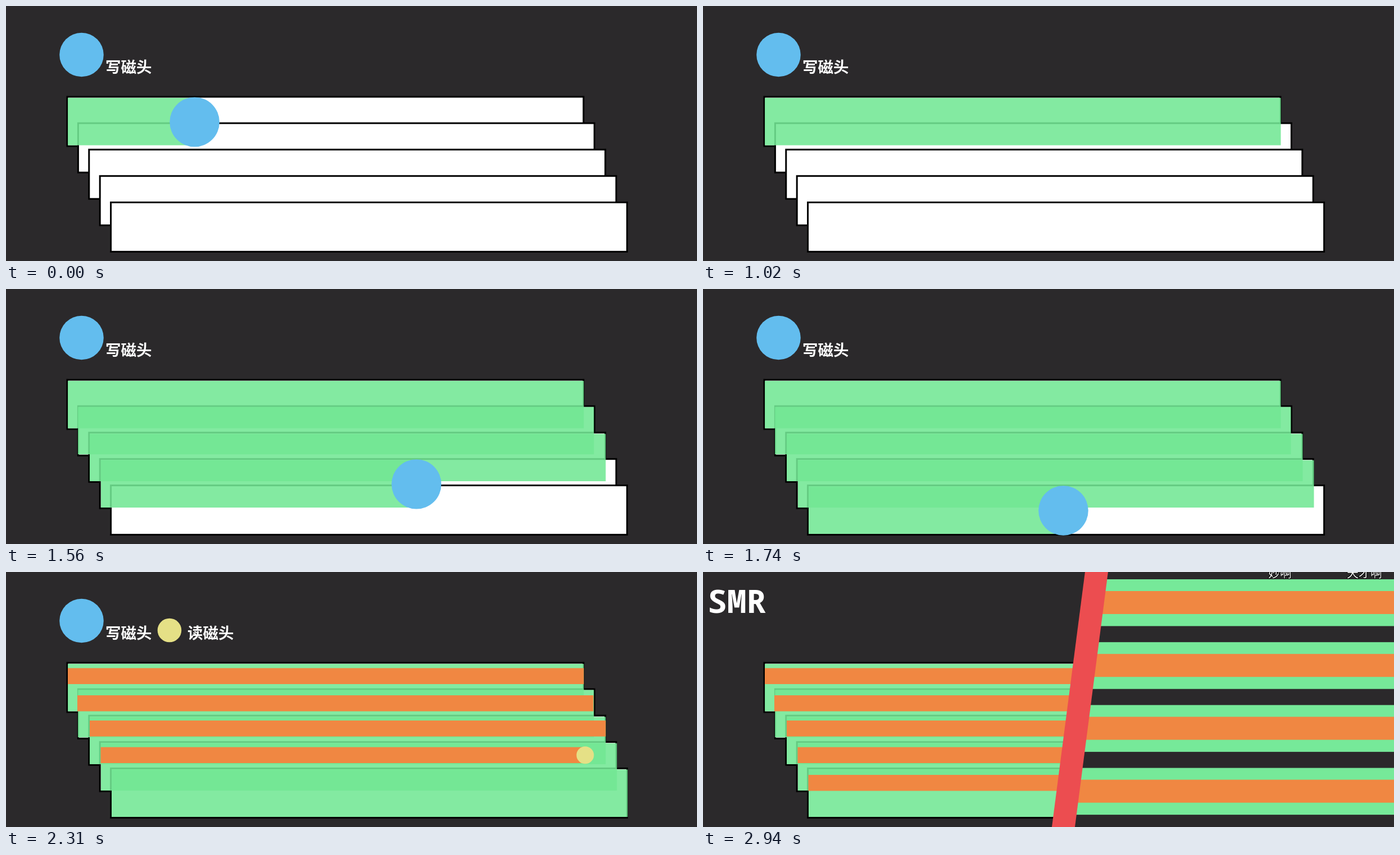
An HTML page with a canvas that plays this animation: 1230 by 455 pixels, repeating every 2.97 s.

```html
<!DOCTYPE html>
<html lang="zh-CN">
<head>
<meta charset="utf-8">
<title>SMR</title>
<style>
  html, body { margin: 0; width: 100%; height: 100%; overflow: hidden; background: #2b292b; }
  canvas { display: block; }
</style>
</head>
<body>
<canvas id="stage" width="1230" height="455"></canvas>
<script>
const ctx = document.getElementById('stage').getContext('2d');
const LOOP = 2970, STEP = 30;
const LENGTH = 918.5;
const DARK = '#2b292b', BLUE = '#63bdee', YELLOW = '#e5e086', ORANGE = '#f08742';
const GREEN = 'rgba(114,231,148,.88)', RED = '#ec4d50';
const CJK = '"Noto Sans CJK SC", "Noto Sans CJK", sans-serif';
const READ_LEGEND = 1860, SPLIT = 2550, SPLIT_END = 2760;

// Each track: write area, read strip, and the time and duration of its write pass.
const tracks = [
  { wx: 110, wy: 164, rx: 110, ry: 171.5, start: 437, span: 175 },
  { wx: 128, wy: 210.5, rx: 127, ry: 220, start: 1140, span: 90 },
  { wx: 149, wy: 258.5, rx: 149, ry: 265, start: 1252.6, span: 175 },
  { wx: 169, wy: 305.5, rx: 168.5, ry: 312.5, start: 1453, span: 175 },
  { wx: 188, wy: 352.5, rx: 187.5, ry: 362, start: 1653.6, span: 175 }
];

const clamp = v => Math.min(1, Math.max(0, v));
const progress = (t, start, span) => clamp((t - start) / span);

function box(x, y, w, h, color) {
  ctx.fillStyle = color;
  ctx.fillRect(x, y, w, h);
}

function disc(x, y, r, color) {
  ctx.fillStyle = color;
  ctx.beginPath();
  ctx.arc(x, y, r, 0, 2 * Math.PI);
  ctx.fill();
}

function label(text, x, y, font) {
  ctx.font = font;
  ctx.fillStyle = '#fff';
  ctx.fillText(text, x, y);
}

function quad(points, color) {
  ctx.beginPath();
  points.forEach(p => ctx.lineTo(...p));
  ctx.closePath();
  ctx.fillStyle = color;
  ctx.fill();
}

function drawLegend(t) {
  const font = '700 27.5px ' + CJK;
  disc(134.5, 87, 39.3, BLUE);
  label('写磁头', 177, 119, font);
  if (t >= READ_LEGEND) {
    disc(291, 104, 21.3, YELLOW);
    label('读磁头', 323, 119, font);
  }
}

function drawTracks(t) {
  tracks.forEach((_, i) => {
    const x = 109 + 19.4 * i, y = 162 + 47.1 * i;
    box(x, y, 919, 88, '#fff');
    ctx.strokeStyle = '#000';
    ctx.lineWidth = 3;
    ctx.strokeRect(x, y, 919, 88);
  });

  const heads = [];
  tracks.forEach((k, i) => {
    const written = progress(Math.max(t, 480), k.start, k.span);
    const w = written * LENGTH;
    box(k.wx, k.wy, w, 84.5, GREEN);
    if (written > 0 && written < 1) heads.push([k.wx + w, 207 + 47.1 * i, 44.3, BLUE]);
  });
  tracks.forEach((k, i) => {
    const read = progress(t, 1896 + 106.7 * i, 100);
    const w = read * LENGTH;
    box(k.rx, k.ry, w, 28.5, ORANGE);
    if (read > 0 && read < 1) heads.push([k.rx + w, k.ry + 14.2, 15.5, YELLOW]);
  });
  heads.forEach(h => disc(...h));
}

function drawComments(t) {
  const dx = (2940 - t) / STEP * 20;
  ctx.lineWidth = 2;
  ctx.strokeStyle = '#000';
  ctx.font = '500 21px ' + CJK;
  [['妙啊', 1006], ['天才啊', 1146]].forEach(([text, x]) => {
    ctx.strokeText(text, x + dx, 8.5);
    label(text, x + dx, 8.5, ctx.font);
  });
}

function drawSplit(t) {
  const p = progress(t, SPLIT - STEP, SPLIT_END - SPLIT + STEP);
  const dx = 620 * (1 - p) ** 3;
  ctx.save();
  ctx.translate(dx, 0);
  quad([[700, 0], [1230, 0], [1230, 455], [641, 455]], DARK);
  ctx.save();
  ctx.clip();
  for (let i = 0; i < 4; i++) {
    const y = 13 + 112.2 * i;
    box(600, y, 630, 83.5, '#76e999');
    box(600, y + 21, 630, 41, ORANGE);
  }
  ctx.restore();
  quad([[680, 0], [721, 0], [662, 455], [621, 455]], RED);
  ctx.restore();
  label('SMR', 8, 72.5, '700 58px "Noto Sans Mono", monospace');
  drawComments(t);
}

function draw(t) {
  ctx.lineJoin = 'miter';
  box(0, 0, 1230, 455, DARK);
  drawTracks(t);
  if (t < SPLIT) drawLegend(t);
  else drawSplit(t);
}

const begin = performance.now();
function tick() {
  const t = (performance.now() - begin) % LOOP;
  draw(Math.floor(t / STEP) * STEP);
  requestAnimationFrame(tick);
}
tick();
</script>
</body>
</html>
```
